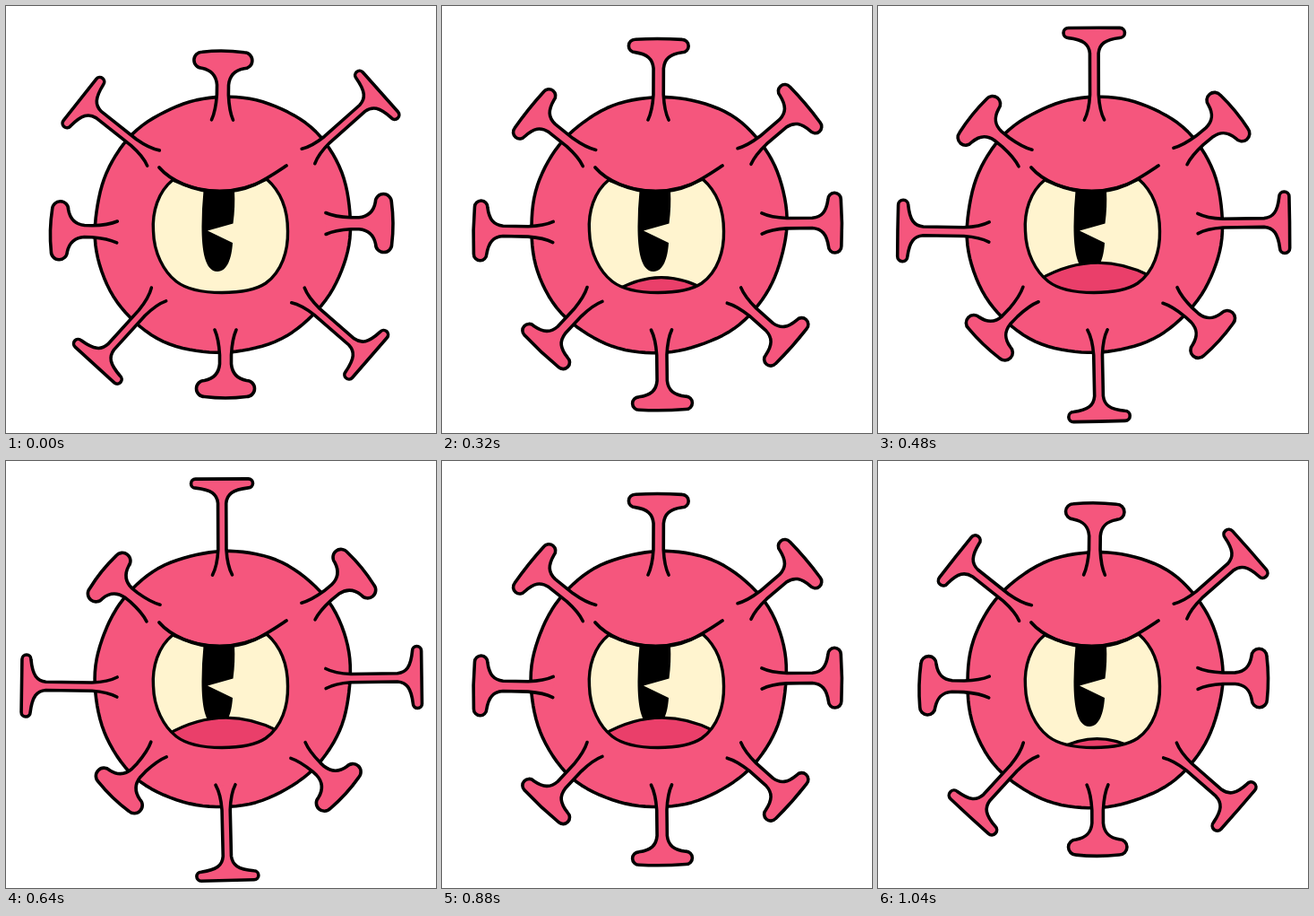
Recreate the animation shown at these times as an HTML page with a canvas. Size 480 px wide and 476 px high, loop 1120 ms.

```html
<!DOCTYPE html>
<html lang="en">
<head>
<meta charset="utf-8">
<title>Angry germ</title>
<style>
  html, body { margin: 0; width: 100%; height: 100%; overflow: hidden; background: #fff; }
  canvas { display: block; }
</style>
</head>
<body>
<canvas id="stage" width="480" height="476"></canvas>
<script>
const ctx = document.getElementById('stage').getContext('2d');
const PINK = '#f5567d', LID_PINK = '#ea3f6a', CREAM = '#fff4cf', INK = '#000';
const STEP = 80, STEPS = 14;

// Progress of each spike group over half a cycle; the other half mirrors it.
const STRAIGHT = [0, .11, .26, .45, .66, .86, 1];
const DIAGONAL = [0, .15, .35, .58, .77, .92, 1];

// How far the lower lid sits below its fully raised position.
const LID = [60, 60, 60, 24, 16.5, 7, 0, 0, 0, 0, 0, 0, 13, 23.5];

// foot: middle of the base; from/to: middle of the cap's outer edge.
const SPIKES = [
  { foot: [241.5, 127], from: [242.5, 50], to: [241, 20] },
  { foot: [245, 361], from: [245, 437], to: [247.5, 467.5] },
  { foot: [124, 252], from: [49.5, 250], to: [17.5, 250.5] },
  { foot: [357, 242.5], from: [432, 242], to: [464, 241] },
  { foot: [164.5, 169.5], from: [82.5, 104.5], to: [107, 123], diagonal: true },
  { foot: [337.5, 167.5], from: [418, 96], to: [397, 119], diagonal: true },
  { foot: [170.5, 321.5], from: [99, 400], to: [119, 375], diagonal: true },
  { foot: [326, 322.5], from: [406, 392], to: [379, 371], diagonal: true }
];

const EYE = new Path2D('M186 194C170 207 163 229 164.5 251C165 275 176 296 190 307' +
  'C203 317 221 319.5 241 319.5C261 319.5 278 317 290 309C308 296 315 273 314.5 251' +
  'C314.5 228 307 207 291 193Q241 219 186 194Z');
const BROW = new Path2D('M171 180C183 194 209 207 238 207C271 207 289 194 313 178');
const PUPIL = new Path2D('M220.5 206L255 206Q256 224 253.5 242.5L225 250.5L253 264' +
  'C252 281 247 296 236 296C222 296 218.5 272 218.5 246Q218.5 226 220.5 206Z');

const mix = (a, b, t) => a + (b - a) * t;

function ink(path, width = 3.6) {
  ctx.lineWidth = width;
  ctx.strokeStyle = INK;
  path ? ctx.stroke(path) : ctx.stroke();
}

// Three slightly different hand-drawn outlines, cycled on every step.
function body(step) {
  const k = step % 3;
  const cy = k === 2 ? 243 : 244;
  ctx.beginPath();
  for (let i = 0; i < 120; i++) {
    const a = i / 120 * Math.PI * 2;
    const r = 143.5 - 2 * Math.sin(2 * a) - Math.cos(4 * a)
      + .4 * Math.sin(7 * a + k * 2.1) + .2 * Math.sin(13 * a + k * 1.7);
    ctx.lineTo(242 + r * Math.cos(a), cy + r * Math.sin(a));
  }
  ctx.closePath();
  ctx.fillStyle = PINK;
  ctx.fill();
  ink();
}

function spike({ foot, from, to, diagonal }, pose) {
  const t = (diagonal ? DIAGONAL : STRAIGHT)[pose];
  const u = diagonal ? 1 - t : t; // 1 when fully stretched
  const dx = mix(from[0], to[0], t) - foot[0];
  const dy = mix(from[1], to[1], t) - foot[1];
  const len = Math.hypot(dx, dy);
  const half = 32.5 + 2 * u, r = 9 - 4 * u, stem = 6.5 - 1.9 * u;
  const base = 12 - u, flare = 38 - 11 * u;
  const end = half - r, rim = len - 1.5 * (1 - u), under = rim - 2 * r;

  ctx.save();
  ctx.translate(foot[0], foot[1]);
  ctx.rotate(Math.atan2(dy, dx) - Math.PI / 2);
  ctx.beginPath();
  ctx.moveTo(-base, 0);
  ctx.quadraticCurveTo(-stem - 1, 10, -stem, 28);
  ctx.lineTo(-stem, len - flare);
  ctx.bezierCurveTo(-stem - 1, under - 7, -stem - 7, under - 2, -end, under);
  ctx.arc(-end, rim - r, r, -Math.PI / 2, Math.PI / 2, true);
  ctx.quadraticCurveTo(0, len + 1.5 * (1 - u), end, rim);
  ctx.arc(end, rim - r, r, Math.PI / 2, -Math.PI / 2, true);
  ctx.bezierCurveTo(stem + 7, under - 2, stem + 1, under - 7, stem, len - flare);
  ctx.lineTo(stem, 28);
  ctx.quadraticCurveTo(stem + 1, 10, base, 0);
  ctx.fillStyle = PINK;
  ctx.fill();
  ink();
  ctx.restore();
}

function eye(drop) {
  ctx.fillStyle = CREAM;
  ctx.fill(EYE);
  ctx.save();
  ctx.clip(EYE);
  ctx.fillStyle = INK;
  ctx.fill(PUPIL);
  const left = 305 + 1.3 * drop, right = 301 + 1.3 * drop;
  ctx.beginPath();
  ctx.moveTo(180, left);
  ctx.quadraticCurveTo(242, 269.5 + .7 * drop, 304, right);
  ctx.lineTo(304, 400);
  ctx.lineTo(180, 400);
  ctx.closePath();
  ctx.fillStyle = LID_PINK;
  ctx.fill();
  ink(null, 3.2);
  ctx.restore();
  ink(EYE, 3.4);
  ink(BROW, 3.8);
}

function draw() {
  const step = Math.floor(performance.now() / STEP) % STEPS;
  const pose = step < 8 ? Math.max(0, step - 1) : 14 - step;
  ctx.fillStyle = '#fff';
  ctx.fillRect(0, 0, 480, 476);
  ctx.lineCap = ctx.lineJoin = 'round';
  body(step);
  SPIKES.forEach(s => spike(s, pose));
  eye(LID[step]);
  requestAnimationFrame(draw);
}
draw();
</script>
</body>
</html>
```
